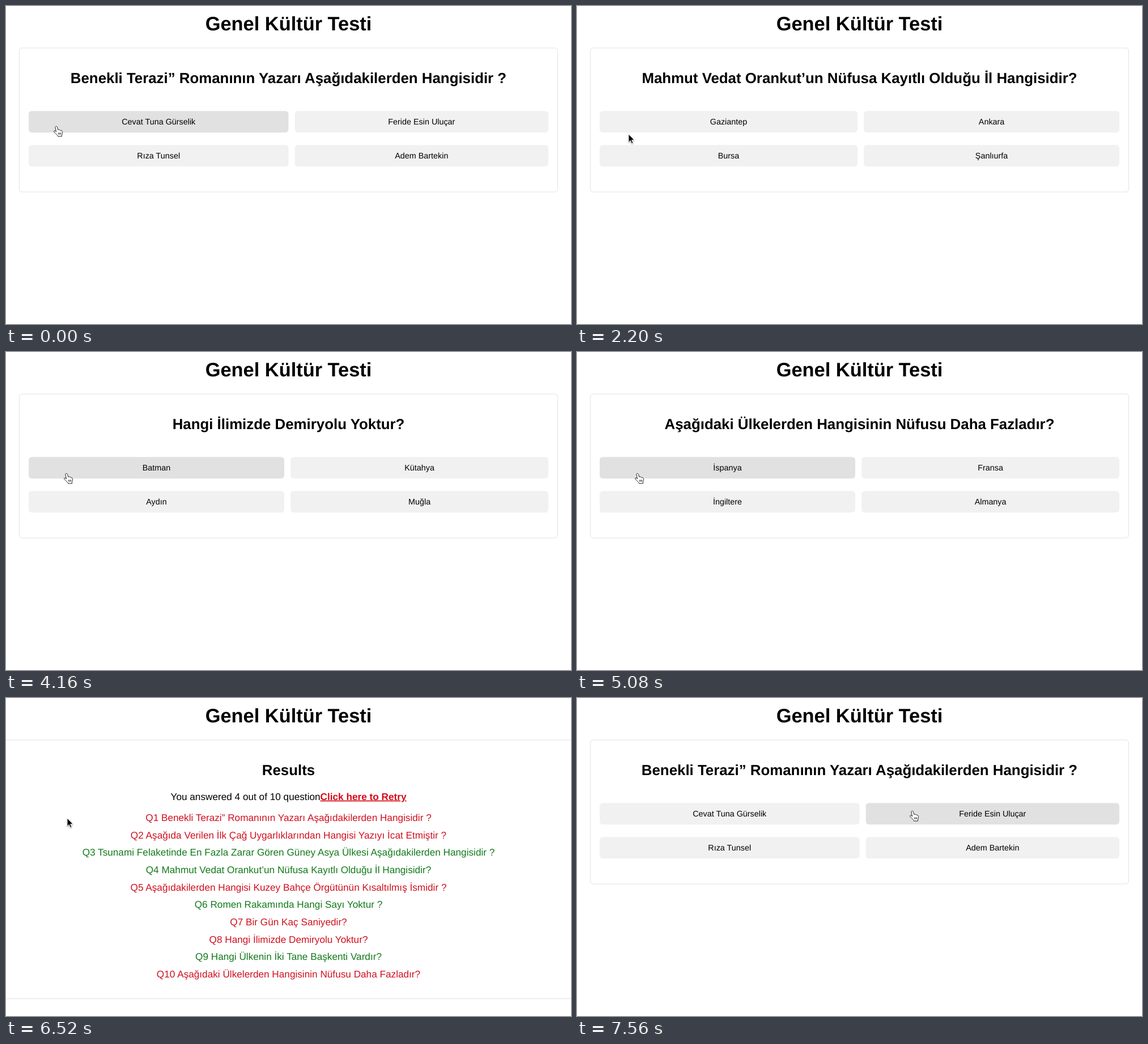
These frames come from a looping animation (997 by 561 pixels, 7.6 s). An HTML page:

```html
<!DOCTYPE html>
<html lang="tr">
<head>
<meta charset="utf-8">
<style>
html, body { margin: 0; width: 100%; height: 100%; overflow: hidden; background: #fff; }
svg { display: block; font-family: "Liberation Sans", Arial, sans-serif; text-rendering: geometricPrecision; }
text { text-anchor: middle; }
.title { font: bold 34.4px "Liberation Sans", Arial, sans-serif; }
.head { font: bold 25.85px "Liberation Sans", Arial, sans-serif; }
.label { font-size: 14.37px; }
.line { font-size: 17.2px; }
.link { font-weight: bold; fill: #d60a18; text-decoration: underline; }
.card { fill: none; stroke: #e2e2e2; }
.arrow { fill: #000; stroke: #fff; filter: drop-shadow(0 1px 1px #0006); }
.hand { fill: #fff; stroke: #222; stroke-linejoin: round; }
</style>
</head>
<body>
<svg id="stage" width="997" height="561" viewBox="0 0 997 561"></svg>
<script>
const LOOP = 7600, STEP = 40, MID = 498.5;
const stage = document.getElementById('stage');

// Heading ("|" breaks the line), right edge of the left column, answers, answered correctly
const quiz = [
  ['Benekli Terazi” Romanının Yazarı Aşağıdakilerden Hangisidir ?', 498.5,
    ['Cevat Tuna Gürselik', 'Feride Esin Uluçar', 'Rıza Tunsel', 'Adem Bartekin'], false],
  ['Aşağıda Verilen İlk Çağ Uygarlıklarından Hangisi Yazıyı İcat Etmiştir ?', 491,
    ['Hititler', 'Sümerler', 'Elamlar', 'Urartular'], false],
  ['Tsunami Felaketinde En Fazla Zarar Gören Güney Asya Ülkesi|Aşağıdakilerden Hangisidir ?', 499,
    ['Endonezya', 'Srilanka', 'Tayland', 'Hindistan'], true],
  ['Mahmut Vedat Orankut’un Nüfusa Kayıtlı Olduğu İl Hangisidir?', 495,
    ['Gaziantep', 'Ankara', 'Bursa', 'Şanlıurfa'], true],
  ['Aşağıdakilerden Hangisi Kuzey Bahçe Örgütünün Kısaltılmış İsmidir ?', 487.5,
    ['Uhw', 'Kublef', 'Kbö', 'Dalu'], false],
  ['Romen Rakamında Hangi Sayı Yoktur ?', 493,
    ['0', '50', '100', '500'], true],
  ['Bir Gün Kaç Saniyedir?', 493,
    ['86000', '86400', '85400', '88400'], false],
  ['Hangi İlimizde Demiryolu Yoktur?', 491,
    ['Batman', 'Kütahya', 'Aydın', 'Muğla'], false],
  ['Hangi Ülkenin İki Tane Başkenti Vardır?', 495,
    ['Güney Afrika', 'Danimarka', 'Norveç', 'Portekiz'], true],
  ['Aşağıdaki Ülkelerden Hangisinin Nüfusu Daha Fazladır?', 491,
    ['İspanya', 'Fransa', 'İngiltere', 'Almanya'], false]
];

// Start of each page; index 10 is the result page, 11 the first question again
const starts = [0, 960, 1360, 1840, 2640, 3360, 3720, 4120, 4480, 4840, 5360, 7000];

// Cursor tip: time, x, y
const path = [
  [0, 89, 212], [1420, 89, 212], [1640, 91, 226], [2360, 91, 226], [2480, 98, 218],
  [2640, 98, 218], [2960, 104, 225], [3120, 104, 225], [3200, 107, 214], [5400, 107, 214],
  [5640, 108, 212], [6520, 108, 212], [6840, 630, 172], [7080, 630, 172], [7360, 592, 199],
  [LOOP, 592, 199]
];

function cursorAt(t) {
  const i = path.findIndex(p => p[0] > t);
  const [t0, x0, y0] = path[i - 1], [t1, x1, y1] = path[i];
  const u = (t - t0) / (t1 - t0), e = u * u * (3 - 2 * u);
  return [x0 + (x1 - x0) * e, y0 + (y1 - y0) * e];
}

const text = (cls, x, y, body, fill = '#000') =>
  `<text class="${cls}" x="${x}" y="${y}" fill="${fill}">${body}</text>`;

const inside = ([px, py], x, y, w, h) => px >= x && px <= x + w && py >= y && py <= y + h;

function questionPage([heading, edge, answers], tip) {
  const lines = heading.split('|'), drop = (lines.length - 1) * 29.75;
  let over = false;
  let out = `<rect class="card" x="23.5" y="74" width="950" height="${254 + drop}" rx="5"/>`;
  lines.forEach((s, i) => out += text('head', MID, 136.4 + i * 29.75, s));
  answers.forEach((s, i) => {
    const x = i % 2 ? edge + 11.2 : 40, w = (i % 2 ? 957 : edge) - x;
    const y = 185.2 + drop + (i > 1 ? 60 : 0);
    const hit = inside(tip, x, y, w, 38);
    over ||= hit;
    out += `<rect x="${x}" y="${y}" width="${w}" height="38" rx="5.4" fill="${hit ? '#e1e1e1' : '#f1f1f1'}"/>`
      + text('label', x + w / 2, y + 23.9, s);
  });
  return [out, over];
}

function resultPage(tip) {
  let out = '<path class="card" d="M0 74H997M0 530.5H997"/>'
    + text('head', MID, 136.4, 'Results')
    + text('line', MID, 179.7, 'You answered 4 out of 10 question<tspan class="link">Click here to Retry</tspan>');
  quiz.forEach(([heading, , , right], i) => out += text('line', MID, 216.8 + i * 30.7,
    `Q${i + 1} ${heading.replace('|', ' ')}`, right ? '#117a1a' : '#d0101f'));
  return [out, inside(tip, 555, 164, 152, 20)];
}

const arrow = '<path class="arrow" d="M0 0V14.5L3.3 11.4L5.6 16.7L8 15.7L5.7 10.5H10.2Z"/>';
const hand = '<path class="hand" d="M-2.2 2C-2.2 0 .8-.4 1.4 1.6L2.7 6.4C3.4 5.6 5 5.8 5.4 7'
  + 'C6.2 6.3 7.6 6.7 8 8C9 7.5 10.2 8 10.4 9.4C10.8 12 10.2 14 9.4 15.8V18H2.6L2.2 16.6'
  + 'C.4 14.8-2.6 12.2-4.2 10C-5 8.6-3.6 7.4-2.2 8.4L-.4 9.8ZM3.6 11.5V14.7M5.6 11.5V14.7M7.6 11.5V14.7"/>';

function draw(t) {
  const tip = cursorAt(t);
  const page = starts.findLastIndex(s => s <= t);
  const [body, over] = page === 10 ? resultPage(tip) : questionPage(quiz[page % 11], tip);
  stage.innerHTML = text('title', MID, 42.5, 'Genel Kültür Testi') + body
    + `<g transform="translate(${tip})">${over ? hand : arrow}</g>`;
}

const begin = performance.now();
let last = -1;
function tick() {
  const t = Math.floor(((performance.now() - begin) % LOOP) / STEP) * STEP;
  if (t !== last) draw(last = t);
  requestAnimationFrame(tick);
}
tick();
</script>
</body>
</html>
```
